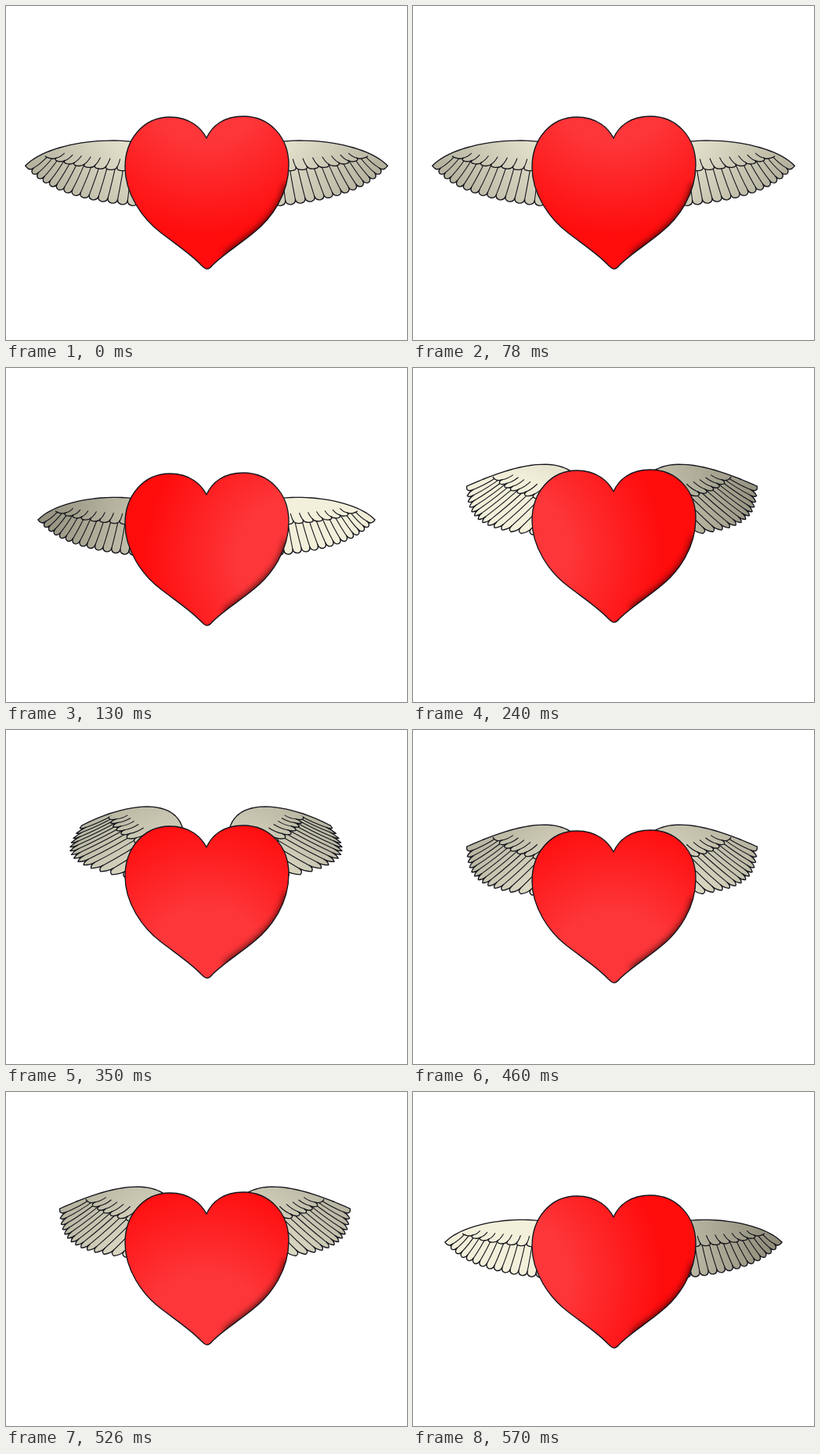
Write an HTML page that moves like this. It is 512 px wide and 427 px high and loops after 680 ms.

```html
<!DOCTYPE html>
<html lang="en">
<head>
<meta charset="utf-8">
<title>Winged heart</title>
<style>
  html, body { margin: 0; width: 100%; height: 100%; overflow: hidden; background: #fff; }
  svg { display: block; width: 100vw; height: 100vh; }
  .line, .rib { fill: none; stroke: #14141c; stroke-width: 1.35; stroke-linecap: round; stroke-linejoin: round; }
  .rib { stroke-width: 1.1; }
</style>
</head>
<body>
<svg viewBox="0 0 512 427" preserveAspectRatio="none">
  <defs>
    <radialGradient id="feather" gradientUnits="userSpaceOnUse" r="370">
      <stop offset=".25" stop-color="#f2f0da"/><stop offset="1" stop-color="#858370"/>
    </radialGradient>
    <radialGradient id="red" gradientUnits="userSpaceOnUse" r="200">
      <stop offset=".4" stop-color="#fd3639"/><stop offset="1" stop-color="#ff0c0d"/>
    </radialGradient>
    <path id="heartShape" d="M256 169C250 157 236 142 209 142C176 142 152 170 152 206C152 240 174 272 198 290C216 304 236 317 249 331Q255 337 257 336Q260 336 264 331C278 317 298 305 316 290C340 271 361 240 361 203C361 168 337 141 303 141C278 141 263 153 256 169Z"/>
    <clipPath id="heartClip"><use href="#heartShape"/></clipPath>
    <filter id="soft" x="-30%" y="-30%" width="160%" height="160%"><feGaussianBlur stdDeviation="5"/></filter>
  </defs>
  <g id="stage">
    <g id="wings"></g>
    <use href="#heartShape" fill="url(#red)"/>
    <g clip-path="url(#heartClip)">
      <path d="M282 323C292 314 306 306 323 291C343 274 359 252 363 228" fill="none" stroke="#100004" stroke-width="13" opacity=".85" filter="url(#soft)"/>
    </g>
    <use href="#heartShape" class="line"/>
  </g>
</svg>
<script>
const $ = id => document.getElementById(id);
const mix = (a, b, k) => a.map((v, c) => v + (b[c] - v) * k);
const push = (p, d, k) => [p[0] + d[0] * k, p[1] + d[1] * k];
const fmt = p => p.map(v => v.toFixed(1)).join(' ');

// Point on a Bezier curve with any number of control points.
function curve(pts, t) {
  while (pts.length > 1) pts = pts.slice(1).map((p, i) => mix(pts[i], p, t));
  return pts[0];
}

// Left wing, relative to the heart: leading edge, curve of feather tips,
// feather tip length, and the sum of mirrored x positions.
const low = {
  edge: [[25, 204], [50, 178], [120, 166], [172, 175]],
  tips: [[25, 204], [50, 238], [105, 250], [168, 256]],
  tip: 6, span: 512
};
const raised = {
  edge: [[69, 162], [120, 139], [185, 117], [214, 154]],
  tips: [[69, 162], [68, 204], [85, 218], [160, 225]],
  tip: 9, span: 508
};
const high = {
  edge: [[97, 141], [150, 113], [222, 101], [227, 153]],
  tips: [[97, 141], [72, 174], [68, 191], [162, 210]],
  tip: 11, span: 511
};

const reshape = (pose, f) => ({ ...pose, edge: pose.edge.map(f), tips: pose.tips.map(f) });
const mid = reshape(low, p => mix(low.edge[3], p, .89));

// A row of overlapping feathers: its scalloped rim and the lines between feathers.
function row(edge, tipAt, n, from, tip, reach) {
  const root = t => curve(edge, from + (1 - from) * t);
  const bend = tip * (1.25 - tip * .06);
  const dir = t => {
    const [dx, dy] = mix(tipAt(t), [0, 0], 0).map((v, c) => v - root(t)[c]);
    const len = Math.hypot(dx, dy) || 1;
    return [dx / len, dy / len];
  };
  const notch = i => push(tipAt(i / n), dir(i / n), i ? -tip : 0);
  let rim = 'M' + fmt(notch(0)), ribs = '';
  for (let i = 0; i < n; i++) {
    const t = (i + .5) / n, d = dir(t), a = notch(i), b = notch(i + 1);
    rim += `Q${fmt(push(a, d, i ? bend : 1))} ${fmt(tipAt(t))}Q${fmt(push(b, d, bend))} ${fmt(b)}`;
    if (i) {
      const end = mix(a, root(i / n), reach);
      ribs += `M${fmt(a)}Q${fmt(push(mix(a, end, .5), [0, 1], 2))} ${fmt(end)}`;
    }
  }
  return { rim, ribs };
}

function edgeLine(edge, from) {
  return Array.from({ length: 25 }, (_, i) => fmt(curve(edge, from + (1 - from) * i / 24)));
}

function wing({ edge, tips, tip }) {
  const longTip = t => curve(tips, t);
  const covertTip = t => mix(curve(edge, .45 + .55 * t), longTip(t), .54 - .08 * t);
  const long = row(edge, longTip, 14, .3, tip, .62);
  const covert = row(edge, covertTip, 9, .5, tip * .75, .3);
  const layer = (r, from) =>
    `<path fill="url(#feather)" d="${r.rim}L${edgeLine(edge, from).reverse().join('L')}Z"/>` +
    `<path class="line" d="${r.rim}"/><path class="rib" d="${r.ribs}"/>`;
  return layer(long, 0) + layer(covert, .3) + `<path class="line" d="M${edgeLine(edge, 0).join('L')}"/>`;
}

const pair = pose => wing(pose) + wing(reshape(pose, ([x, y]) => [pose.span - x, y]));

// One light wanders round the heart and tints heart and feathers alike.
const above = [256, 95], right = [375, 250], left = [120, 245], below = [256, 325];
const frames = [
  { pose: low, y: 0, light: above },
  { pose: mid, y: -7, light: right },
  { pose: raised, y: -11, light: left },
  { pose: high, y: -19, light: below },
  { pose: raised, y: -13, light: below },
  { pose: mid, y: -9, light: left }
];
const step = 110, pause = 20, loop = frames.length * step + pause;

let shown;
function draw(time) {
  const i = Math.max(0, Math.floor((time % loop - pause) / step));
  if (i === shown) return;
  shown = i;
  const { pose, y, light } = frames[i];
  $('stage').setAttribute('transform', `translate(0 ${y})`);
  $('wings').innerHTML = pair(pose);
  for (const id of ['feather', 'red']) {
    $(id).setAttribute('cx', light[0]);
    $(id).setAttribute('cy', light[1]);
  }
}

const start = performance.now();
function tick() {
  draw(performance.now() - start);
  requestAnimationFrame(tick);
}
tick();
</script>
</body>
</html>
```
